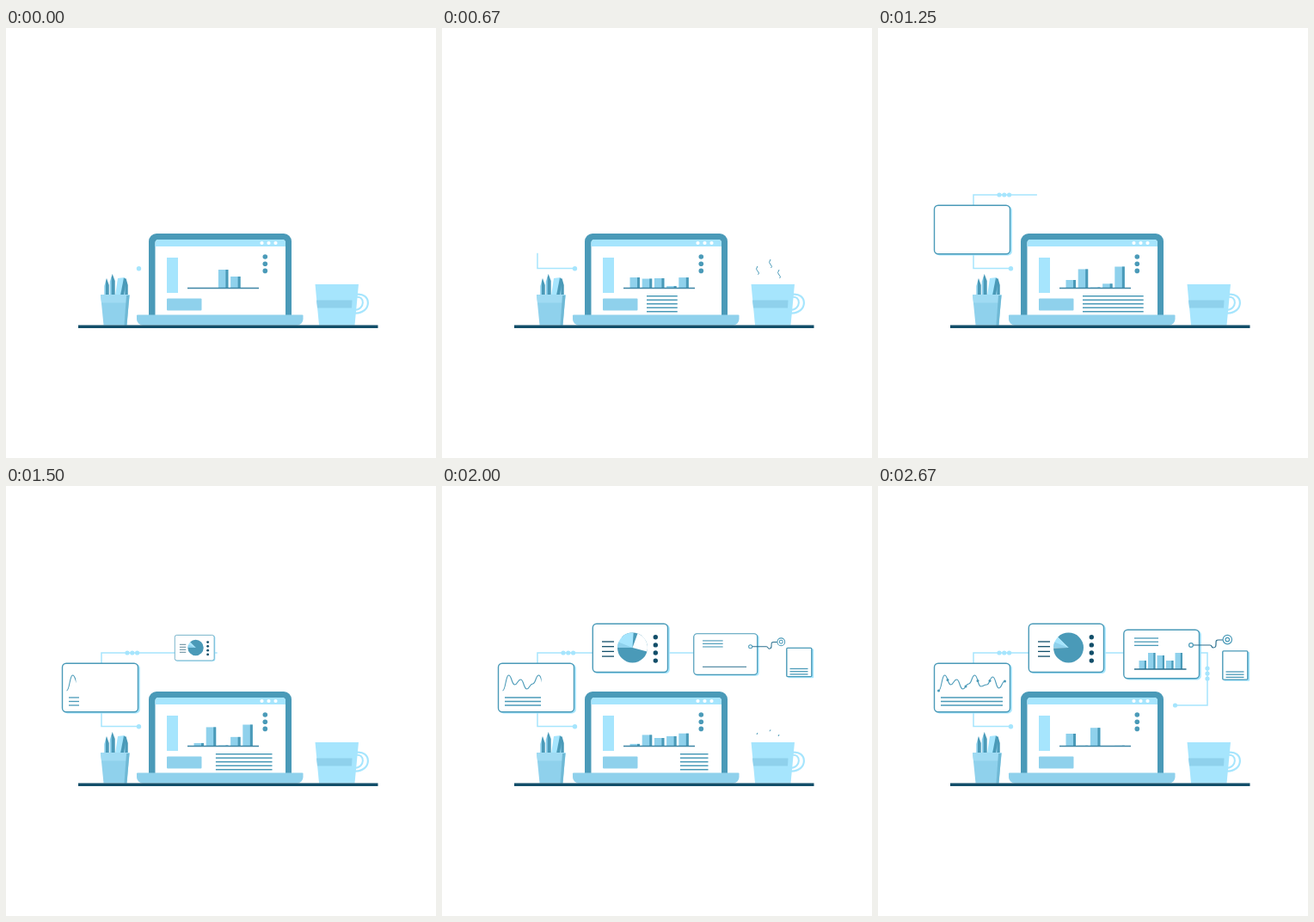
An HTML page with a canvas for the animation above (2.76 s loop, 500 by 500 pixels).

```html
<!DOCTYPE html>
<html lang="en">
<head>
<meta charset="utf-8">
<title>Desk dashboard</title>
<style>
html, body { margin: 0; width: 100%; height: 100%; overflow: hidden; background: #fff }
canvas { display: block }
</style>
</head>
<body>
<canvas width="500" height="500"></canvas>
<script>
const c = document.querySelector('canvas').getContext('2d');
const LIGHT = '#a6e5fd', MID = '#8fd1ec', TEAL = '#4a9ab8', DARK = '#124e69';
const LOOP = 2760, FPS = 12;

const clamp = v => Math.max(0, Math.min(1, v));
const smooth = p => p * p * (3 - 2 * p);
const span = (k, from, to) => clamp((k - from) / (to - from));
const easeOut = p => 1 - (1 - p) ** 3;
const pulse = turns => Math.sin(Math.PI * turns) ** 2;
const series = (n, start, step) => Array.from({ length: n }, (_, i) => start + i * step);

function fill(d, color) {
  c.fillStyle = color;
  c.fill(new Path2D(d));
}
function stroke(d, color, width = 1) {
  c.strokeStyle = color;
  c.lineWidth = width;
  c.stroke(new Path2D(d));
}
function rect(x, y, w, h, color, r = 0) {
  c.fillStyle = color;
  c.beginPath();
  c.roundRect(x, y, w, h, r);
  c.fill();
}
function dot(x, y, r, color) {
  c.fillStyle = color;
  c.beginPath();
  c.arc(x, y, r, 0, 7);
  c.fill();
}
function ring(x, y, r) {
  c.strokeStyle = TEAL;
  c.lineWidth = 1.2;
  c.beginPath();
  c.arc(x, y, r, 0, 7);
  c.stroke();
}
function rows(x0, x1, ys, color, width = 1.3) {
  if (x1 - x0 > .5) for (const y of ys) stroke(`M${x0} ${y}H${x1}`, color, width);
}
function bar(x, base, w, h) {
  rect(x, base - h, w, h, MID);
  rect(x + w * .74, base - h, w * .26, h, TEAL);
}
function scaled(x, y, s, draw) {
  if (s <= 0) return;
  c.save();
  c.translate(x, y);
  c.scale(s, s);
  c.translate(-x, -y);
  draw();
  c.restore();
}
function clipped(x, y, w, h, draw) {
  c.save();
  c.beginPath();
  c.rect(x, y, w, h);
  c.clip();
  draw();
  c.restore();
}
function card(x, y, w, h, r = 4.5) {
  rect(x + 1.5, y + 1, w + .8, h + .6, LIGHT, r);
  rect(x, y, w, h, '#fff', r);
  c.strokeStyle = TEAL;
  c.lineWidth = 1.4;
  c.stroke();
}
function sector(from, to, color) {
  if (to <= from) return;
  c.fillStyle = color;
  c.beginPath();
  c.moveTo(221.5, 188);
  c.arc(221.5, 188, 17.5, from * Math.PI / 180, to * Math.PI / 180);
  c.fill();
}
function pencil(x, top, w) {
  fill(`M${x - w / 2} 311V${top + 9}L${x} ${top}V311z`, MID);
  fill(`M${x - 1} 311V${top + 4}L${x} ${top}L${x + w / 2} ${top + 8}V311z`, TEAL);
}

function desk() {
  // Pencils and their pot
  pencil(117, 291, 5.5);
  pencil(123.7, 286, 6);
  pencil(139.5, 291, 4.5);
  fill('M127 311L130 291L138 290L136 311z', LIGHT);
  fill('M133 311L137 290.5L140 292L137 311z', TEAL);
  fill('M110 310H143.5L140.5 345.5H113.5z', MID);
  fill('M110 310H143.5L143 319.5H111z', '#a0dbf3');
  fill('M140 311H143.5L140.5 345.5H137.5z', '#6fb9d5');

  // Laptop
  rect(166, 239, 166, 95, TEAL, [9, 9, 0, 0]);
  rect(173.5, 246, 151.5, 88, '#fff', [4, 4, 0, 0]);
  rect(173.5, 246, 151.5, 8, LIGHT, [4, 4, 0, 0]);
  for (const x of series(3, 297.5, 8)) dot(x, 250, 2.1, '#fff');
  rect(152, 333.5, 193.5, 12, MID, [1, 1, 7, 7]);
  rect(187, 267, 13, 41, LIGHT);
  rect(187, 314.5, 40.5, 14, MID, 1);
  for (const y of series(3, 266, 8.2)) dot(301.3, y, 2.8, TEAL);

  // Mug
  stroke('M406 310C426 306 426 333 405 331.5', LIGHT, 2.2);
  stroke('M406 313C418 310 418 328 405 328', LIGHT, 2);
  fill('M359.5 298H410L405.5 345.5H364z', LIGHT);
  fill('M361 316.5H402.5L402 325.5H362z', MID);

  rect(84, 345.4, 348.5, 3.6, DARK);
}

function steam(k) {
  const v = pulse(clamp((k - 2.6) % 20 / 9.4));
  for (const [x, y, rise] of [[367, 289.5, 13.5], [382, 287, 19], [392, 291, 10.5]]) {
    const top = y - rise * v;
    clipped(x - 4, top, 8, 10.5 * v, () => stroke(`M${x} ${top}q-3 4 0 6t0 5`, TEAL));
  }
}

function screen(k) {
  // Each bar swings as [height, period, phase]
  [[14, 21.3, 0], [22, 33, 0], [21, 33, .5], [13, 21.3, .5], [25, 33, 0]].forEach(([h, period, phase], i) =>
    bar(218.5 + i * 14.2, 302, 11.5, h * pulse(k / period + phase)));
  stroke('M211 302.5H294', '#3d85a5', 1.5);
  rows(238 + 71.5 * smooth(span(k, 15, 32)), 238 + 71.5 * smooth(span(k, 0, 16)), series(5, 311.8, 4.5), TEAL, 1.5);
}

function connector(k) {
  const length = 500 * span(k, 5, 29.7);
  if (length) {
    c.setLineDash([length, 999]);
    stroke('M154 279.5H111V194H383V255H345', LIGHT, 1.5);
    c.setLineDash([]);
  }
  const bead = (x, y, at) => dot(x, y, 2.6 * clamp((length - at) / 14), LIGHT);
  dot(154.5, 279.7, 2.7, LIGHT);
  for (const x of series(3, 141, 5.8)) bead(x, 194, x + 18);
  for (const y of series(3, 212, 6)) bead(383, y, y + 207);
  bead(345.5, 255, 486);
}

const waveY = [238, 220, 231, 225, 236, 230, 220, 233, 231, 222, 235, 227];
const waveX = i => 70.5 + 7 * i;
const wave = 'M70.5 238' + waveY.slice(1).map((y, i) =>
  `C${waveX(i + .5)} ${waveY[i]} ${waveX(i + .5)} ${y} ${waveX(i + 1)} ${y}`).join('');

function waveCard(k) {
  card(65.5, 206.2, 88, 56.6);
  if (k > 16) clipped(69, 210, 1 + 5.7 * (k - 16), 32, () => stroke(wave, TEAL, 1.1));
  for (const i of [0, 1.5, 4.5, 6.5, 8.5, 11])
    dot(waveX(i), (waveY[Math.floor(i)] + waveY[Math.ceil(i)]) / 2, 1.5 * span(k, 28, 31), TEAL);
  rows(73, 73 + 72 * span(k, 15.6, 30), series(3, 246, 4.5), TEAL);
}

function pieCard(k) {
  card(175.3, 160.2, 87.2, 56.3);
  rows(186, 200, series(4, 181, 5.7), DARK);
  // A gap sweeps clockwise through the pie
  const gap = 290 + 31 * (k - 24);
  sector(225, 540, TEAL);
  sector(180, 225 + 65 * clamp(1 - Math.abs(k - 23) / 4), LIGHT);
  sector(180, 202, MID);
  sector(Math.max(225, gap), Math.min(540, gap + 85), '#fff');
  for (const y of series(4, 175.8, 9.1)) dot(248.3, y, 2.7, DARK);
}

function barCard(k) {
  card(285.8, 167.3, 87.7, 56.5);
  rows(298, 326, series(3, 177, 4.2), TEAL);
  [10, 19, 16, 10, 19].forEach((h, i) => bar(303.5 + i * 10.5, 213, 8.5, h * span(k, 24, 31)));
  stroke('M298 213H358.5', '#2b6f8e', 1.3);
  stroke('M366.5 185H386C389 185 387 188 390 188S393 186 393 183 393 179 396 179H401', '#2b6f8e', 1.2);
  ring(364, 185, 2.4);
  ring(406.3, 178.6, 5.2);
  ring(406.3, 178.6, 2.3);
}

function noteCard() {
  card(400.8, 191.9, 29, 33.2, 1);
  rows(404.5, 425.5, series(3, 216, 3.2), TEAL);
}

function draw(k) {
  c.fillStyle = '#fff';
  c.fillRect(0, 0, 500, 500);
  const pop = start => easeOut(span(k, start, start + 5));
  desk();
  screen(k);
  steam(k);
  connector(k);
  scaled(110, 235, pop(9.1), () => waveCard(k));
  scaled(219.5, 188, pop(16.9), () => pieCard(k));
  scaled(330, 195.5, pop(21.7), () => barCard(k));
  c.save();
  c.translate(0, -3.5 * (1 - span(k, 24, 27)));
  scaled(415.5, 208.5, easeOut(span(k, 20, 24)), noteCard);
  c.restore();
}

function tick() {
  const t = performance.now() % LOOP;
  draw(Math.min(32, Math.floor((t + 5) * FPS / 1000)));
  requestAnimationFrame(tick);
}
tick();
</script>
</body>
</html>
```
